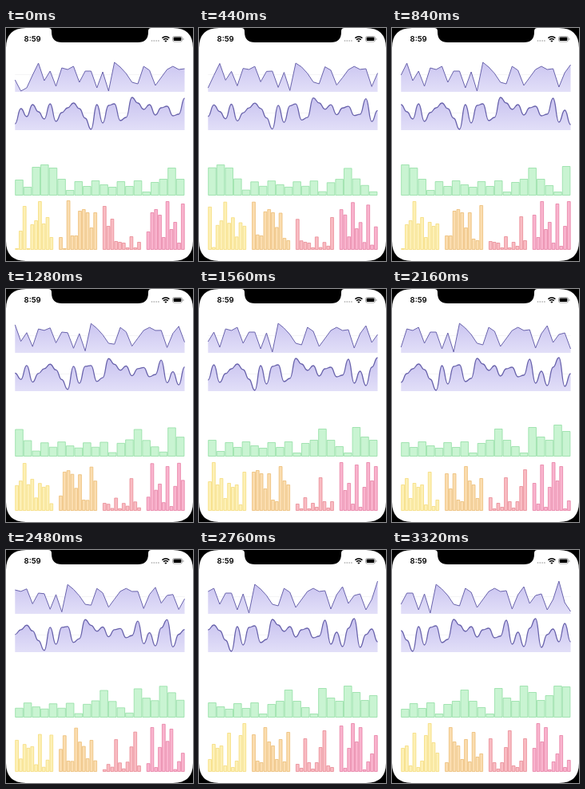
Recreate the animation shown at these times as an HTML page with a canvas. Size 234 px wide and 292 px high, loop 3360 ms.

```html
<!DOCTYPE html>
<html lang="en">
<head>
<meta charset="utf-8">
<style>
  html, body { margin: 0; width: 100%; height: 100%; overflow: hidden; background: #fff; }
  canvas, svg { position: absolute; left: 0; top: 0; width: 234px; height: 292px; display: block; }
  text { font: 600 9.6px Inter, "Liberation Sans", sans-serif; }
</style>
</head>
<body>
<canvas id="charts"></canvas>
<svg viewBox="0 0 234 292">
  <path fill-rule="evenodd" d="M0 0H234V292H0Z M25 0H53Q57 0 57 4V5Q57 18 70 18H165Q178 18 178 5V4Q178 0 182 0H209Q234 0 234 25V267Q234 292 209 292H25Q0 292 0 267V25Q0 0 25 0Z"/>
  <text x="22.5" y="17.3">8:59</text>
  <g fill="#bbb">
    <circle cx="182.5" cy="16" r=".9"/><circle cx="185.3" cy="16" r=".9"/>
    <circle cx="188.1" cy="16" r=".9"/><circle cx="190.9" cy="16" r=".9"/>
  </g>
  <g fill="none" stroke="#000" stroke-width="1.4">
    <path d="M195.4 12.6Q199.9 8.8 204.4 12.6"/>
    <path d="M197 14.7Q199.9 12.3 202.8 14.7"/>
  </g>
  <path d="M198.2 16Q199.9 14.8 201.6 16L199.9 17.7Z"/>
  <rect x="208.5" y="10.5" width="12" height="6.6" rx="2" fill="none" stroke="#999" stroke-width=".8"/>
  <rect x="209.6" y="11.6" width="9.8" height="4.4" rx="1"/>
  <rect x="221.4" y="12.6" width="1" height="2.4" rx=".5" fill="#999"/>
</svg>
<script>
const LOOP = 3360, STEP = 300;
const LEFT = 11.3, RIGHT = 223.5;

const lines = [
  { base: 80, top: 38, width: 1, smooth: false, y: [
    65, 79, 75, 59, 44, 66, 54, 73, 50, 52, 48, 68, 54, 54, 75, 55, 79, 43, 49, 57, 68,
    70, 48, 53, 72, 62, 52, 48, 52, 51, 74, 56, 46, 67, 57, 55, 75, 62, 39, 66, 77] },
  { base: 128, top: 85, width: 1.3, smooth: true, y: [
    120, 101, 111, 96, 105, 114, 95, 117, 106, 100, 94, 101, 113, 127, 96, 119, 97, 95, 116, 112, 87,
    94, 102, 96, 109, 100, 98, 110, 108, 88, 118, 103, 121, 98, 86, 122, 106, 99, 115, 92, 115] }
];

const bars = [
  { x: LEFT, w: 212.2, base: 209.5, count: 20, fill: '#c9f4d2', stroke: '#92dfa4', h: [
    19, 10, 35, 38, 34, 20, 6, 17, 11, 18, 13, 10, 17, 11, 18, 4, 16, 20, 34, 20, 12,
    4, 36, 24, 20, 39, 31, 21, 27, 39, 38] },
  { x: LEFT, w: 48, base: 277.5, count: 10, fill: '#fdf0b6', stroke: '#f5dc7c', h: [
    1, 23, 54, 1, 31, 36, 60, 32, 40, 15, 34, 29, 32, 7, 48, 5, 13, 45, 60, 36, 23] },
  { x: 66.2, w: 48, base: 277.5, count: 10, fill: '#fbddb0', stroke: '#edbd74', h: [
    15, 1, 61, 17, 17, 48, 50, 46, 27, 46, 13, 11, 55, 37, 32, 15, 40, 12, 49, 18, 22] },
  { x: 121, w: 48, base: 277.5, count: 10, fill: '#f9bcc3', stroke: '#e98993', h: [
    54, 29, 38, 10, 9, 8, 2, 16, 2, 9, 4, 41, 11, 3, 11, 30, 51, 7, 5, 13, 41] },
  { x: 175.8, w: 48, base: 277.5, count: 10, fill: '#f9b4ce', stroke: '#e87fa4', h: [
    22, 46, 50, 43, 15, 60, 25, 34, 8, 57, 4, 29, 60, 37, 55, 2, 12, 22, 45, 5, 14] }
];

const canvas = document.getElementById('charts');
const scale = window.devicePixelRatio || 1;
canvas.width = 234 * scale;
canvas.height = 292 * scale;
const ctx = canvas.getContext('2d');
ctx.scale(scale, scale);
ctx.lineJoin = 'round';

const easeInOut = p => p < .5 ? 4 * p ** 3 : 1 - 4 * (1 - p) ** 3;

// Number of values scrolled past; the fraction blends old and new heights in place.
function shiftAt(t) {
  const p = Math.min(1, Math.max(0, (t % STEP - 60) / 100));
  return Math.floor(t / STEP) + easeInOut(p);
}

function visible(data, count, shift) {
  const from = Math.floor(shift), mix = shift - from;
  return Array.from({ length: count }, (_, i) => {
    const a = data[from + i], b = data[from + i + 1] ?? a;
    return a + (b - a) * mix;
  });
}

function drawLine({ base, top, width, smooth, y }, shift) {
  const ys = visible(y, 30, shift), dx = (RIGHT - LEFT) / 29;
  const path = new Path2D();
  path.moveTo(LEFT, ys[0]);
  for (let i = 1; i < ys.length; i++) {
    const x = LEFT + i * dx, mid = x - dx / 2;
    if (smooth) path.bezierCurveTo(mid, ys[i - 1], mid, ys[i], x, ys[i]);
    else path.lineTo(x, ys[i]);
  }
  const area = new Path2D(path);
  area.lineTo(RIGHT, base);
  area.lineTo(LEFT, base);
  area.closePath();

  ctx.fillStyle = '#eeeef0';
  ctx.fillRect(LEFT, Math.round((base + top) / 2) - 1, RIGHT - LEFT, .6);
  const shade = ctx.createLinearGradient(0, top, 0, base);
  shade.addColorStop(0, '#c7c1ef');
  shade.addColorStop(1, '#e2dff8');
  ctx.fillStyle = shade;
  ctx.fill(area);
  ctx.strokeStyle = '#6963ac';
  ctx.lineWidth = width;
  ctx.stroke(path);
}

function drawBars({ x, w, base, count, fill, stroke, h }, shift) {
  const step = w / count;
  ctx.fillStyle = fill;
  ctx.strokeStyle = stroke;
  ctx.lineWidth = .8;
  visible(h, count, shift).forEach((height, i) => {
    const box = [x + i * step + .4, base - height, step - 1, height];
    ctx.fillRect(...box);
    ctx.strokeRect(...box);
  });
}

function draw(t) {
  const shift = shiftAt(t);
  ctx.fillStyle = '#fff';
  ctx.fillRect(0, 0, 234, 292);
  lines.forEach(line => drawLine(line, shift));
  bars.forEach(group => drawBars(group, shift));
}

const start = performance.now();
function tick() {
  draw((performance.now() - start) % LOOP);
  requestAnimationFrame(tick);
}
tick();
</script>
</body>
</html>
```
